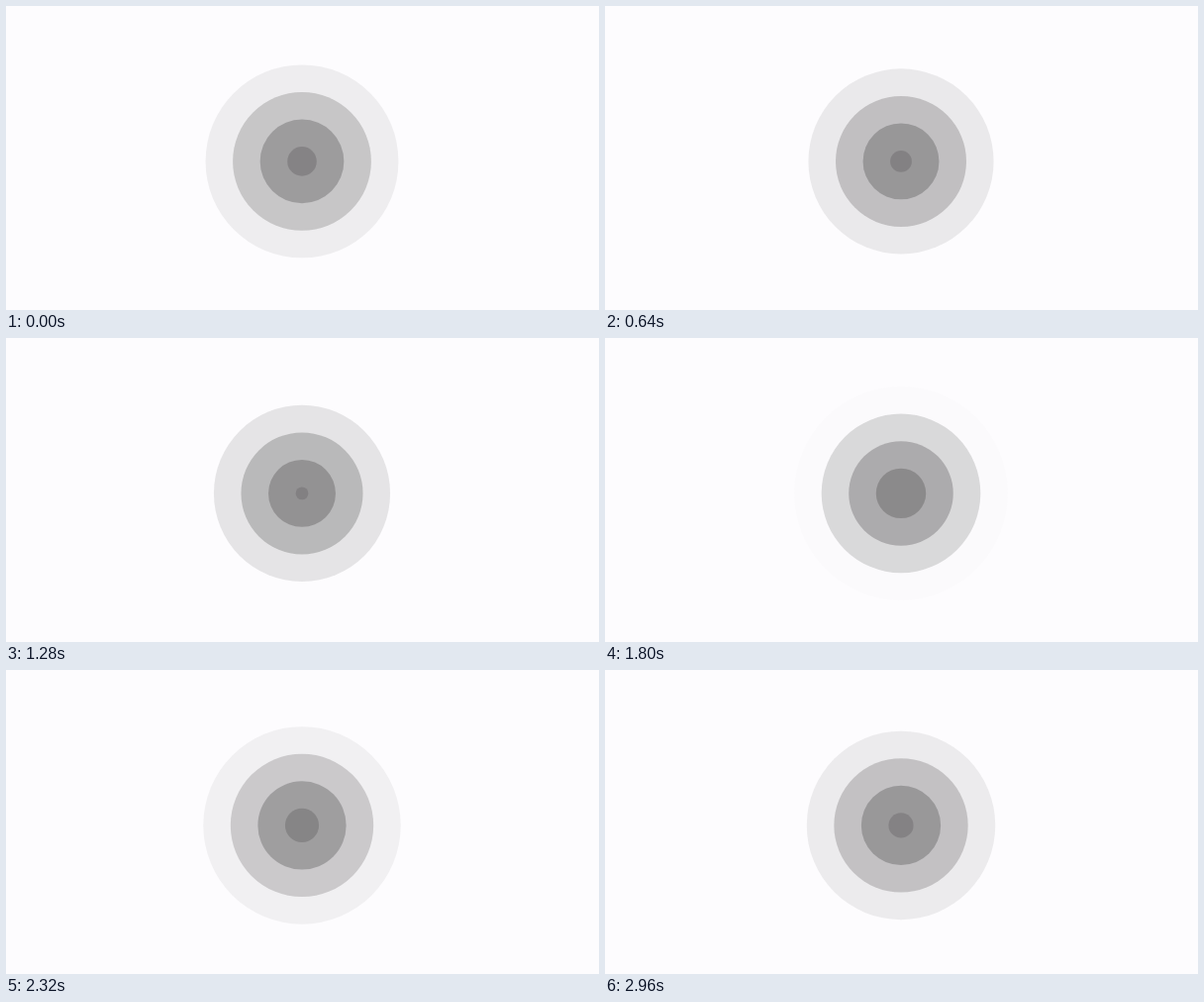
Animation, 599 px wide and 307 px high, one loop 3000 ms. Source, as an HTML page with a canvas:

```html
<!DOCTYPE html>
<html lang="en">
<head>
<meta charset="utf-8">
<title>Ripple</title>
<style>
  html, body { margin: 0; width: 100%; height: 100%; overflow: hidden; background: #fdfcfe; }
  canvas { display: block; }
</style>
</head>
<body>
<canvas id="stage" width="599" height="307"></canvas>
<script>
const ctx = document.getElementById('stage').getContext('2d');
const LOOP = 3000, STEP = 40;
const RINGS = 4, GAP = 27.55, MAX = RINGS * GAP;
const START = 14.8, SPEED = 0.0364; // px, px per ms

function draw(now) {
  // 25 steps a second, each snapped up to a 60 Hz tick
  const step = Math.floor(now % LOOP / STEP);
  const time = Math.ceil(step * 12 / 5) * 1000 / 60;
  const inner = (START + SPEED * time) % GAP;

  ctx.clearRect(0, 0, 599, 307);
  for (let i = RINGS - 1; i >= 0; i--) {
    const radius = inner + i * GAP;
    ctx.fillStyle = `rgba(130, 128, 130, ${1 - radius / MAX})`;
    ctx.beginPath();
    ctx.arc(299, 156.9, radius, 0, 2 * Math.PI);
    ctx.fill();
  }
}

const begin = performance.now();
function tick() {
  draw(performance.now() - begin);
  requestAnimationFrame(tick);
}
tick();
</script>
</body>
</html>
```
